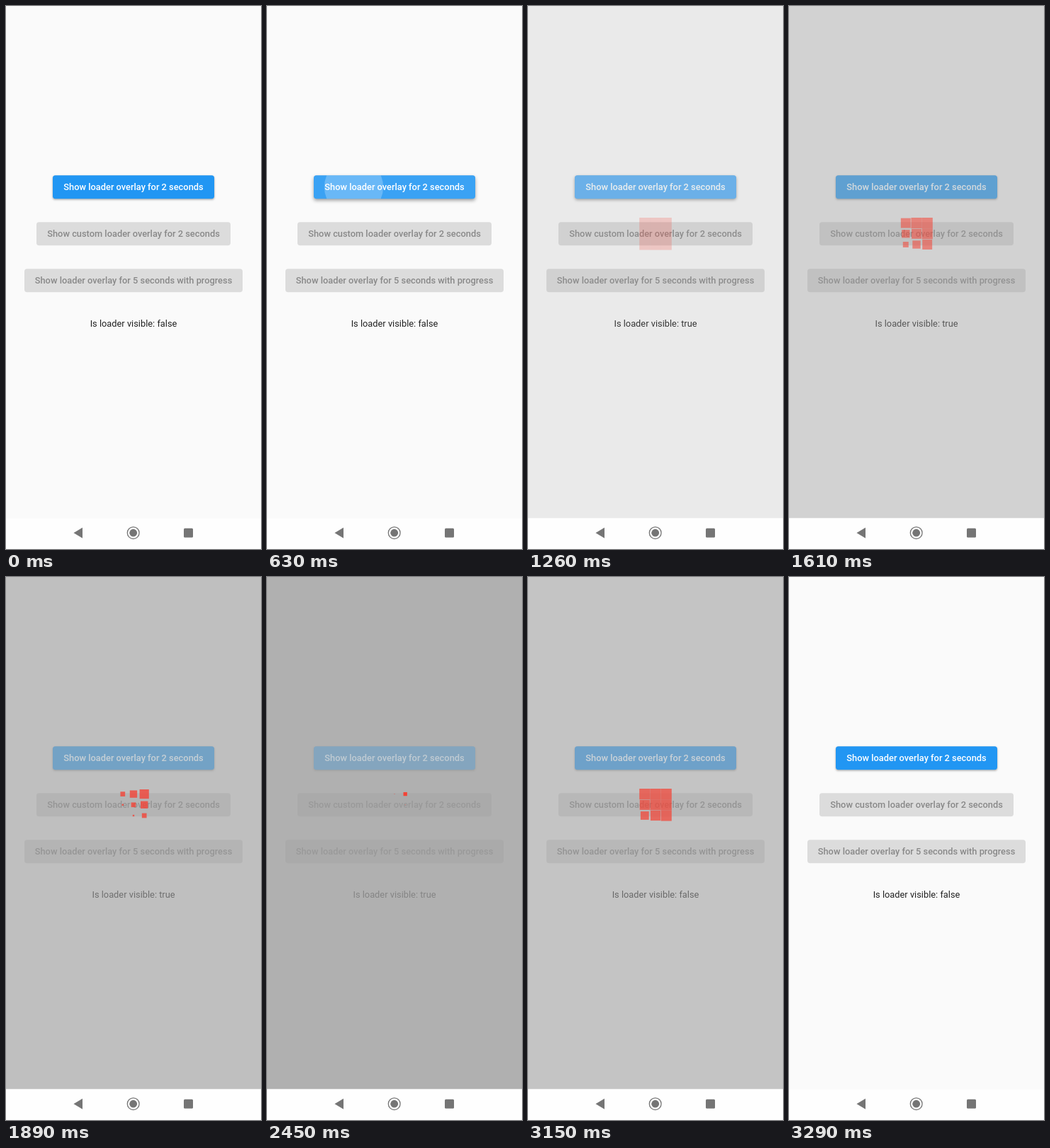
Animation of 360x767 px, one loop 3710 ms. Source, as an HTML page with a canvas:

```html
<!DOCTYPE html>
<html lang="en">
<head>
<meta charset="utf-8">
<title>Loader overlay</title>
<style>
  html, body { margin: 0; width: 100%; height: 100%; overflow: hidden; background: #fafafa; }
  canvas { display: block; width: 360px; height: 767px; }
</style>
</head>
<body>
<canvas id="stage"></canvas>
<script>
const W = 360, H = 767, NAV = 723.5;
const LOOP = 3710, STEP = 70;
const PRESS = 535, SHOW = 1095, HIDE = 3095, DONE = 3290;
const BTN = { x: 66, y: 239.2, w: 228, h: 33 };

const canvas = document.getElementById('stage');
const ctx = canvas.getContext('2d');
const dpr = window.devicePixelRatio || 1;
canvas.width = Math.round(W * dpr);
canvas.height = Math.round(H * dpr);

const clamp = v => Math.min(1, Math.max(0, v));
const lerp = (a, b, k) => a + (b - a) * k;
const span = (t, start, length) => clamp((t - start) / length);

function bezier(x1, y1, x2, y2) {
  const at = (a, b, s) => 3 * a * s * (1 - s) ** 2 + 3 * b * s * s * (1 - s) + s ** 3;
  return x => {
    if (x <= 0 || x >= 1) return clamp(x);
    let lo = 0, hi = 1;
    for (let i = 0; i < 24; i++) {
      const mid = (lo + hi) / 2;
      if (at(x1, x2, mid) < x) lo = mid; else hi = mid;
    }
    return at(y1, y2, lo);
  };
}
const ease = bezier(0.25, 0.1, 0.25, 1);
const easeIn = bezier(0.42, 0, 1, 1);

function roundRect(x, y, w, h, r) {
  ctx.beginPath();
  ctx.roundRect(x, y, w, h, r);
}

function disc(x, y, r) {
  ctx.beginPath();
  ctx.arc(x, y, r, 0, Math.PI * 2);
}

function label(text, y, color, weight = 500) {
  ctx.font = `${weight} 12.83px Roboto, sans-serif`;
  ctx.textAlign = 'center';
  ctx.fillStyle = color;
  ctx.fillText(text, W / 2, y);
}

function disabledButton(text, x, y, w) {
  roundRect(x, y, w, 33, 3.7);
  ctx.fillStyle = 'rgba(0,0,0,0.12)';
  ctx.fill();
  label(text, y + 20.8, 'rgba(0,0,0,0.38)');
}

const buttonPath = () => roundRect(BTN.x, BTN.y, BTN.w, BTN.h, 3.7);

function mainButton(t) {
  const press = span(t, PRESS, 200) * (1 - span(t, SHOW, 200));

  ctx.save();
  ctx.shadowColor = `rgba(0,0,0,${lerp(0.34, 0.4, press)})`;
  ctx.shadowBlur = lerp(3, 9, press) * dpr;
  ctx.shadowOffsetY = lerp(1.4, 4, press) * dpr;
  buttonPath();
  ctx.fillStyle = '#2196f3';
  ctx.fill();
  ctx.restore();

  ctx.save();
  buttonPath();
  ctx.clip();
  ctx.fillStyle = `rgba(255,255,255,${0.24 * press})`;
  ctx.fillRect(BTN.x, BTN.y, BTN.w, BTN.h);

  // ripple grows slowly while held, then finishes quickly on release
  const alpha = 0.24 * span(t, PRESS, 75) * (1 - span(t, SHOW + 225, 150));
  if (alpha > 0) {
    const held = ease(span(Math.min(t, SHOW), PRESS, 1000));
    const k = lerp(held, 1, ease(span(t, SHOW, 225)));
    disc(lerp(117, 180, k), BTN.y + BTN.h / 2, lerp(34.5, 116, k));
    ctx.fillStyle = `rgba(255,255,255,${alpha})`;
    ctx.fill();
  }
  ctx.restore();
  label('Show loader overlay for 2 seconds', 260, '#fff');
}

function cubes(t) {
  const size = 15.2, phase = ((t - SHOW - 8) / 1208) % 2;
  const p = phase > 1 ? 2 - phase : phase;
  ctx.fillStyle = '#f44336';
  for (let row = 0; row < 3; row++) {
    for (let col = 0; col < 3; col++) {
      const begin = 0.1 * (3 - row + col);
      const s = size * (1 - easeIn(span(p, begin, 0.5)));
      ctx.fillRect(180 + (col - 1) * size - s / 2, 321.8 + (row - 1) * size - s / 2, s, s);
    }
  }
}

function overlay(t) {
  const fade = span(t, SHOW, 1060) ** 0.82 * (1 - span(t, HIDE, DONE - HIDE));
  if (fade <= 0) return;
  ctx.fillStyle = `rgba(158,158,158,${0.8 * fade})`;
  ctx.fillRect(0, 0, W, NAV);

  // the active button keeps some of its colour under the veil
  buttonPath();
  ctx.fillStyle = `rgba(130,185,225,${0.3 * fade})`;
  ctx.fill();
  label('Show loader overlay for 2 seconds', 260, `rgba(255,255,255,${0.3 * fade})`);

  ctx.globalAlpha = fade;
  cubes(Math.max(t, SHOW + 8));
  ctx.globalAlpha = 1;
}

function navBar() {
  ctx.fillStyle = '#fefefe';
  ctx.fillRect(0, NAV, W, H - NAV);
  ctx.fillStyle = ctx.strokeStyle = '#757575';

  ctx.beginPath();
  ctx.moveTo(95.5, 744.2);
  ctx.lineTo(108, 736.8);
  ctx.lineTo(108, 751.8);
  ctx.closePath();
  ctx.fill();

  disc(179.7, 744.2, 8.4);
  ctx.lineWidth = 1.3;
  ctx.stroke();
  disc(179.7, 744.2, 5.4);
  ctx.fill();

  roundRect(251, 737.8, 13, 13, 1.5);
  ctx.fill();
}

function draw(t) {
  ctx.setTransform(dpr, 0, 0, dpr, 0, 0);
  ctx.fillStyle = '#fafafa';
  ctx.fillRect(0, 0, W, H);
  mainButton(t);
  disabledButton('Show custom loader overlay for 2 seconds', 43, 305.2, 274);
  disabledButton('Show loader overlay for 5 seconds with progress', 26, 371.2, 308);
  const visible = t >= SHOW && t < HIDE;
  label(`Is loader visible: ${visible}`, 453.2, 'rgba(0,0,0,0.87)', 400);
  overlay(t);
  navBar();
}

const origin = performance.now();
function tick() {
  const t = (performance.now() - origin) % LOOP;
  draw(Math.floor(t / STEP) * STEP);
  requestAnimationFrame(tick);
}
tick();
</script>
</body>
</html>
```
